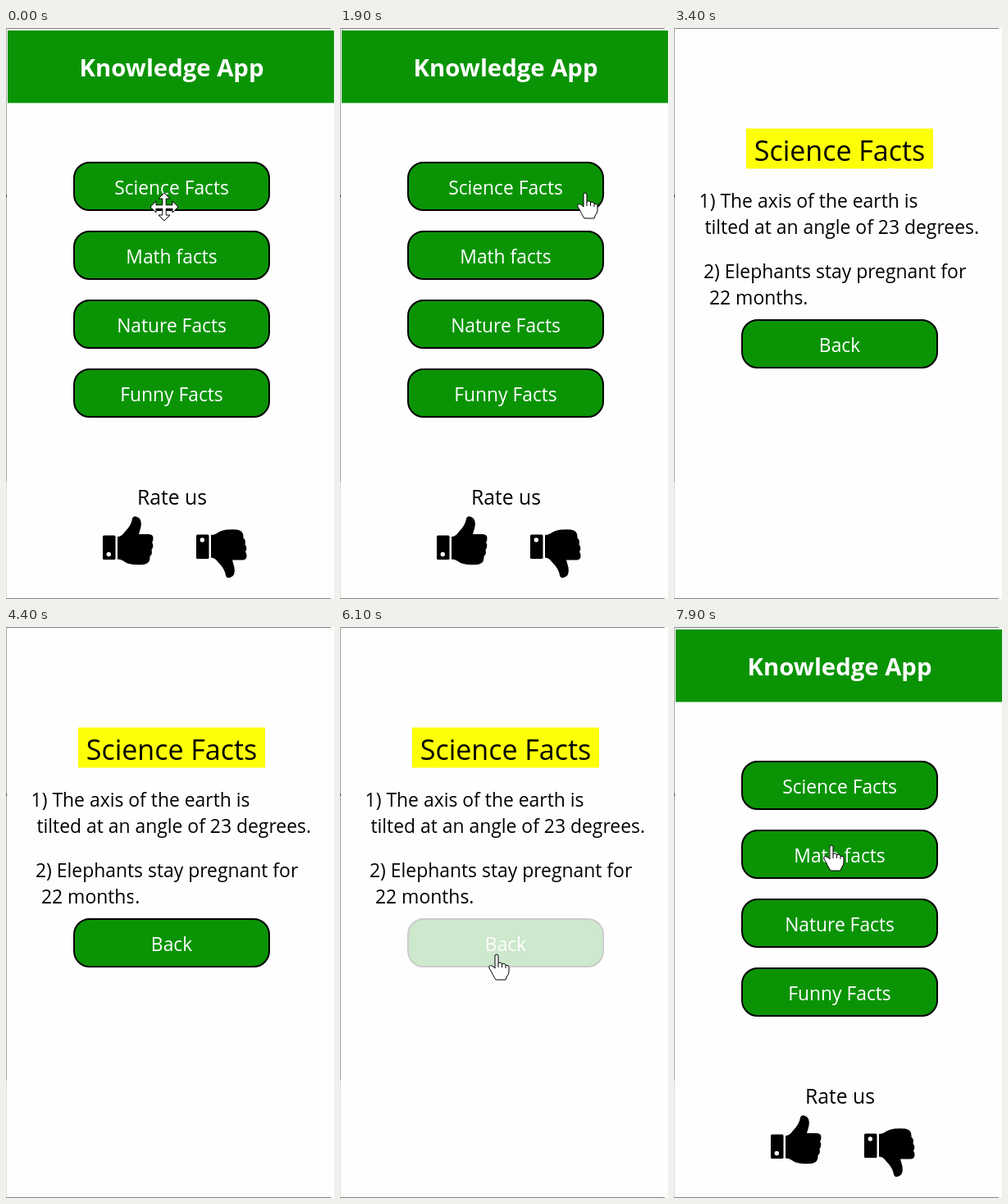
An HTML page with a canvas for the animation above (8 s loop, 400 px wide and 696 px high).

```html
<!DOCTYPE html>
<html lang="en">
<head>
<meta charset="utf-8">
<title>Knowledge App</title>
<style>
  html, body { margin: 0; width: 100%; height: 100%; overflow: hidden; background: #fefefe; }
  canvas { display: block; width: 400px; height: 696px; }
</style>
</head>
<body>
<canvas id="stage"></canvas>
<script>
const W = 400, H = 696, LOOP = 8000;
const GREEN = '#0a9405', PAPER = '#fefefe';
const SANS = '"Open Sans", "Noto Sans", sans-serif';
const BODY = '22.8px ' + SANS;

const canvas = document.getElementById('stage');
const ctx = canvas.getContext('2d');
const dpr = window.devicePixelRatio || 1;
canvas.width = W * dpr;
canvas.height = H * dpr;

const MENU = ['Science Facts', 'Math facts', 'Nature Facts', 'Funny Facts']
  .map((label, i) => ({ label, y: 163 + 84 * i }));
const BACK = [{ label: 'Back', y: 355 }];
const FACTS = [
  ['1) The axis of the earth is', 30.6, 219],
  ['tilted at an angle of 23 degrees.', 37.4, 251],
  ['2) Elephants stay pregnant for', 36, 305],
  ['22 months.', 43, 337]
];

// Pointer hot spot: time, x, y
const TRAIL = [
  [0, 193, 218], [900, 193, 218], [1400, 344, 222], [1800, 299, 201],
  [1950, 299, 201], [2700, 264, 182], [3400, 264, 182], [4400, 156, 330],
  [4750, 156, 330], [5500, 191, 399], [6400, 191, 399], [6900, 197, 322],
  [7100, 197, 322], [7700, 192, 266], [LOOP, 192, 266]
];
const FACTS_IN = 3300, FACTS_OUT = 6300;

const FIST = new Path2D(
  'M136 620Q141 620 145 614Q153 606 154 598Q155 594 160 596Q166 598 164.5 608' +
  'L162 617H174Q180 617 179.5 623Q179 626 178 627Q181 631 177.5 636Q179 641 175.5 644' +
  'Q176 651 171 653Q168 655 155 654Q147 653 143 649.5Q140 647.5 136 647.5Z');
const HAND = new Path2D(
  'M-2 2Q-2 0 0 0Q2 0 2 2V11Q4 8.5 6.5 11V12Q9 10 11 12.5V13.5Q15 12.5 15 15.5V21' +
  'Q15 24 12.5 27L11 31H-1L-3.5 27Q-4 26 -6 22L-9 17Q-10 14 -7.5 13.5Q-5 13.5 -2 17Z');
const KNUCKLES = new Path2D('M2 11V16M6.5 12V16M11 13.5V17');
const ARROW = new Path2D('M0 0V23L5.5 18L9 26L13 24.5L9.5 16.5H16.5Z');
const BEAM = new Path2D('M-4 -10H4M0 -10V10M-4 10H4');
const FOUR_WAY = fourWay();

function fourWay() {
  const path = new Path2D();
  const arm = [[-2.2, -2.2], [-2.2, -10], [-7, -10], [0, -17], [7, -10], [2.2, -10]];
  for (let k = 0; k < 4; k++) {
    const c = Math.round(Math.cos(k * Math.PI / 2));
    const s = Math.round(Math.sin(k * Math.PI / 2));
    for (const [x, y] of arm) path.lineTo(x * c - y * s, x * s + y * c);
  }
  path.closePath();
  return path;
}

const clamp = v => Math.max(0, Math.min(1, v));
const smooth = v => v * v * (3 - 2 * v);

function rect(x, y, w, h, color) {
  ctx.fillStyle = color;
  ctx.fillRect(x, y, w, h);
}

function text(str, x, y, font, color, align = 'center') {
  ctx.font = font;
  ctx.fillStyle = color;
  ctx.textAlign = align;
  ctx.fillText(str, x, y);
}

function button({ label, y }, fade = 0) {
  ctx.beginPath();
  ctx.roundRect(83, y + 1, 238, 58, 19);
  ctx.fillStyle = GREEN;
  ctx.fill();
  ctx.lineWidth = 2;
  ctx.strokeStyle = '#000';
  ctx.stroke();
  text(label, 202, y + 40, BODY, '#fff');
  if (fade > 0) {
    ctx.globalAlpha = 0.8 * fade;
    rect(80, y - 2, 244, 64, PAPER);
    ctx.globalAlpha = 1;
  }
}

function thumb() {
  ctx.fillStyle = '#000';
  ctx.fill(FIST);
  ctx.beginPath();
  ctx.roundRect(118, 618.5, 15.5, 29.5, 1.5);
  ctx.fill();
  ctx.beginPath();
  ctx.arc(125.3, 641.5, 2.7, 0, Math.PI * 2);
  ctx.fillStyle = '#fff';
  ctx.fill();
}

// Fades in over 150 ms on press and back out after release
function press(t, down, up) {
  return smooth(clamp((t - down) / 150)) * (1 - smooth(clamp((t - up) / 150)));
}

function frameLines() {
  rect(0, 0, W, H, PAPER);
  rect(0, 0, 396, 1, '#858585');
  rect(0, 695, 396, 1, '#858585');
  rect(0, 0, 1, 553, '#a6a6a6');
  rect(0, 553, 1, 142, '#dedede');
  rect(0, 203, 1, 3, '#444');
}

function home(t) {
  rect(2, 3, 398, 88.4, GREEN);
  text('Knowledge App', 202, 59, 'bold 29.3px ' + SANS, '#fff');
  MENU.forEach((item, i) => button(item, i ? 0 : press(t, 2880, 3220)));
  text('Rate us', 202.5, 581, '24.7px ' + SANS, '#000');
  thumb();
  ctx.save();
  ctx.translate(114, 1265.5);
  ctx.scale(1, -1);
  thumb();
  ctx.restore();
}

function facts(t) {
  rect(88, 122.5, 228, 49, '#fdff08');
  text('Science Facts', 202, 162, '34px ' + SANS, '#000');
  for (const [line, x, y] of FACTS) text(line, x, y, '22.9px ' + SANS, '#000', 'left');
  button(BACK[0], press(t, 5900, 6220));
}

function pointerAt(t) {
  const i = TRAIL.findIndex(p => p[0] > t);
  const [t0, x0, y0] = TRAIL[i - 1], [t1, x1, y1] = TRAIL[i];
  const k = smooth((t - t0) / (t1 - t0));
  return [x0 + (x1 - x0) * k, y0 + (y1 - y0) * k];
}

function outlined(path) {
  ctx.fillStyle = '#fff';
  ctx.strokeStyle = '#000';
  ctx.lineWidth = 1;
  ctx.fill(path);
  ctx.stroke(path);
}

function pointer(t, onFacts) {
  const [x, y] = pointerAt(t);
  const over = (onFacts ? BACK : MENU)
    .some(b => x > 82 && x < 322 && y >= b.y && y <= b.y + 60);
  ctx.save();
  ctx.translate(x, y);
  ctx.lineJoin = 'round';
  if (t < 900) {
    outlined(FOUR_WAY);
  } else if (over) {
    outlined(HAND);
    ctx.stroke(KNUCKLES);
  } else if (onFacts && y < 345) {
    ctx.strokeStyle = '#fff';
    ctx.lineWidth = 1.6;
    ctx.stroke(BEAM);
  } else {
    outlined(ARROW);
  }
  ctx.restore();
}

function draw() {
  const t = performance.now() % LOOP;
  const onFacts = t >= FACTS_IN && t < FACTS_OUT;
  ctx.setTransform(dpr, 0, 0, dpr, 0, 0);
  frameLines();
  (onFacts ? facts : home)(t);
  pointer(t, onFacts);
  requestAnimationFrame(draw);
}
draw();
</script>
</body>
</html>
```
